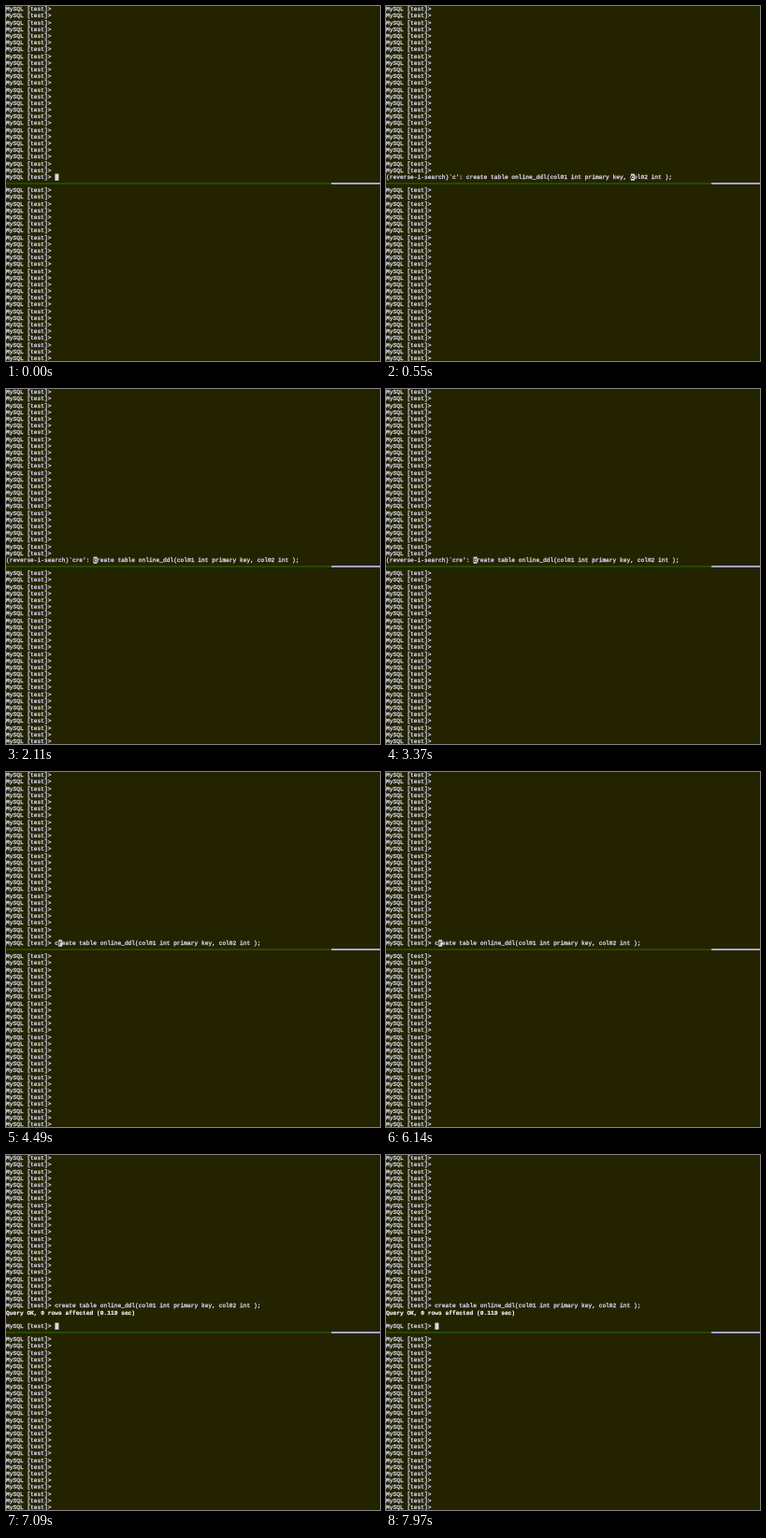
An HTML page for the animation above (8 s loop, 400 by 380 pixels).

```html
<!DOCTYPE html>
<html lang="en">
<head>
<meta charset="utf-8">
<title>Terminal session</title>
<style>
  html, body { margin: 0; width: 100%; height: 100%; overflow: hidden; background: #242300; }
  svg { display: block; width: 400px; height: 380px; }
  text {
    font: 6.235px "Liberation Mono", "DejaVu Sans Mono", monospace;
    text-rendering: geometricPrecision;
    white-space: pre;
    fill: #dedef8;
    stroke: #dedef8;
    stroke-width: 0.28px;
  }
  text.bold { font-weight: bold; fill: #fff; stroke: #fff; stroke-width: 0.15px; }
  text.under { fill: #242300; stroke: #242300; }
</style>
</head>
<body>
<svg id="screen" viewBox="0 0 400 380"></svg>
<script>
const LOOP = 8000, CELL = 3.741, ROW = 7.185, BASELINE = 5.3;
const LAST = 25, PANE2 = 27, ROWS = 53;
const PROMPT = 'MySQL [test]> ';
const SQL = 'create table online_ddl(col01 int primary key, col02 int );';
const RESULT = 'Query OK, 0 rows affected (0.119 sec)';
const screen = document.getElementById('screen');

function add(tag, attrs, content = '') {
  const el = document.createElementNS('http://www.w3.org/2000/svg', tag);
  for (const key in attrs) el.setAttribute(key, attrs[key]);
  el.textContent = content;
  return screen.appendChild(el);
}

function write(row, col, content, cls = '') {
  return add('text', { x: col * CELL, y: row * ROW + BASELINE, class: cls }, content);
}

// Upper pane with the given lines at the bottom, below the prompts
function pane(from, lines, col) {
  const count = LAST + 1 - lines.length;
  const prompts = Array.from({ length: count }, (_, row) => row < from ? '' : PROMPT);
  return { rows: [...prompts, ...lines], col };
}

function search(typed, offset) {
  const head = "(reverse-i-search)`" + typed + "': ";
  return pane(0, [typed ? head + SQL : head], head.length + offset);
}

const steps = [
  [0, pane(0, [PROMPT], 14)],
  [240, search('', 0)],
  [520, search('c', SQL.indexOf('col02'))],
  [1560, search('cr', 0)],
  [1800, search('cre', 0)],
  [3740, pane(0, [PROMPT + SQL], 15)],
  [6490, pane(0, [PROMPT + SQL, ''], 0)],
  [6600, pane(2, [PROMPT + SQL, RESULT], 0)],
  [6640, pane(0, [PROMPT + SQL, RESULT, '', PROMPT], 14)]
];

add('rect', { width: 400, height: 380, fill: '#242300' });
add('rect', { y: 189, width: 348, height: 2, fill: '#234a06' });
add('rect', { x: 348, y: 189, width: 52, height: 2, fill: '#a8a4c6' });
for (let row = PANE2; row < ROWS; row++) write(row, 0, PROMPT);

const lines = Array.from({ length: LAST + 1 }, (_, row) => write(row, 0, ''));
const cursor = add('rect', { y: LAST * ROW, width: CELL + 0.3, height: ROW, fill: '#d9d9e0' });
const under = write(LAST, 0, '', 'under');

let shown;
function show({ rows, col }) {
  rows.forEach((content, row) => {
    lines[row].textContent = content;
    lines[row].setAttribute('class', content === RESULT ? 'bold' : '');
  });
  cursor.setAttribute('x', col * CELL);
  under.setAttribute('x', col * CELL);
  under.textContent = rows[LAST][col] || '';
}

const start = performance.now();
function tick() {
  const time = (performance.now() - start) % LOOP;
  const state = steps.filter(([at]) => at <= time).pop()[1];
  if (state !== shown) show(shown = state);
  requestAnimationFrame(tick);
}
tick();
</script>
</body>
</html>
```
